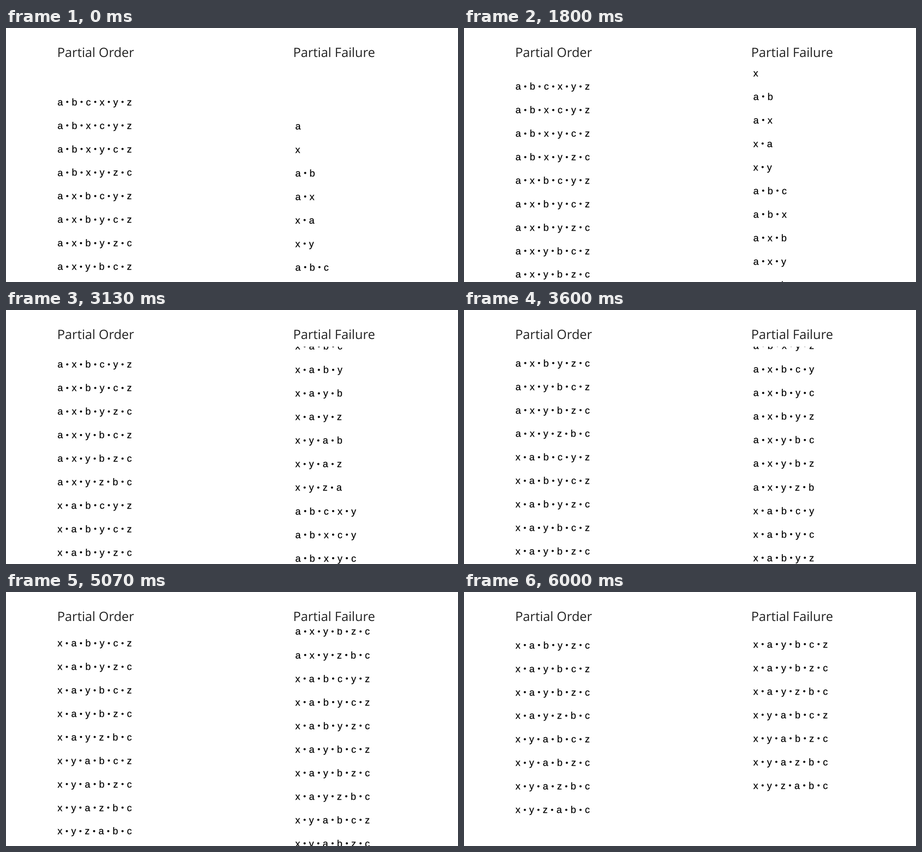
An HTML page for the animation above (7.07 s loop, 998 by 561 pixels).

```html
<!DOCTYPE html>
<html lang="en">
<head>
<meta charset="utf-8">
<title>Partial Order and Partial Failure</title>
<style>
  html, body { margin: 0; width: 100%; height: 100%; overflow: hidden; background: #fff; }
  svg { display: block; width: 998px; height: 561px; }
  text { text-rendering: geometricPrecision; }
  .title { font: 28.35px "Open Sans", sans-serif; fill: #222; }
  .list { font-family: "Liberation Sans", Arial, sans-serif; fill: #000; stroke: #000; stroke-width: .25px; }
  .dot { font-size: .82em; stroke: none; }
</style>
</head>
<body>
<svg viewBox="0 0 998 561">
  <clipPath id="window"><rect y="81" width="998" height="480"/></clipPath>
  <text class="title" x="113" y="64.2">Partial Order</text>
  <text class="title" x="633.9" y="64.2">Partial Failure</text>
  <g id="lists" clip-path="url(#window)"></g>
</svg>
<script>
const SVG = "http://www.w3.org/2000/svg";
const LOOP = 7070, FPS = 15, DELAY = 1000, DURATION = 5000;

// A smaller bullet, kept centred in the room of a full-size one.
const DOT = ' <tspan class="dot" dx=".038em" dy="-.083em">•</tspan>';
const AFTER_DOT = 'dx=".0315em" dy=".068em"';

// Every way to add one more step from either sequence, keeping each one in order.
function extend(runs) {
  return runs.flatMap(run =>
    ["abc", "xyz"].flatMap(seq => {
      const next = [...seq].find(ch => !run.includes(ch));
      return next ? [run + next] : [];
    }));
}

const levels = [[""]];
while (levels.length < 7) levels.push(extend(levels.at(-1)));

function markup(run) {
  return [...run].map((ch, i) =>
    i ? `${DOT}<tspan ${AFTER_DOT}> ${ch}</tspan>` : ch).join("");
}

function makeList(runs, { x, y, pitch, size, travel }) {
  const group = document.createElementNS(SVG, "g");
  group.setAttribute("class", "list");
  group.setAttribute("font-size", size);
  runs.forEach((run, i) => {
    const row = document.createElementNS(SVG, "text");
    row.setAttribute("x", x);
    row.setAttribute("y", y + i * pitch);
    row.innerHTML = markup(run);
    group.append(row);
  });
  document.getElementById("lists").append(group);
  return { group, travel };
}

const lists = [
  makeList(levels[6], { x: 113.8, y: 170.8, pitch: 51.9, size: 21.45, travel: 668.8 }),
  makeList(levels.flat(), { x: 638.8, y: 171.5, pitch: 52.05, size: 21.52, travel: 3276 })
];

// The CSS ease-in-out curve, cubic-bezier(.42, 0, .58, 1).
function easeInOut(p) {
  if (p <= 0) return 0;
  if (p >= 1) return 1;
  let lo = 0, hi = 1, u = p;
  for (let i = 0; i < 30; i++) {
    const v = 1 - u;
    const x = 3 * v * v * u * .42 + 3 * v * u * u * .58 + u * u * u;
    if (x < p) lo = u; else hi = u;
    u = (lo + hi) / 2;
  }
  return u * u * (3 - 2 * u);
}

// Steps fall on fifteenths of a second, rounded to 10 ms.
function stepTime(ms) {
  const t = Math.floor((ms % LOOP) / 10) * 10;
  return Math.floor((t + 5) * FPS / 1000) * 1000 / FPS;
}

const start = performance.now();

function draw() {
  const t = stepTime(performance.now() - start);
  const progress = easeInOut((t - DELAY) / DURATION);
  for (const { group, travel } of lists) {
    group.setAttribute("transform", `translate(0 ${-progress * travel})`);
  }
  requestAnimationFrame(draw);
}
draw();
</script>
</body>
</html>
```
